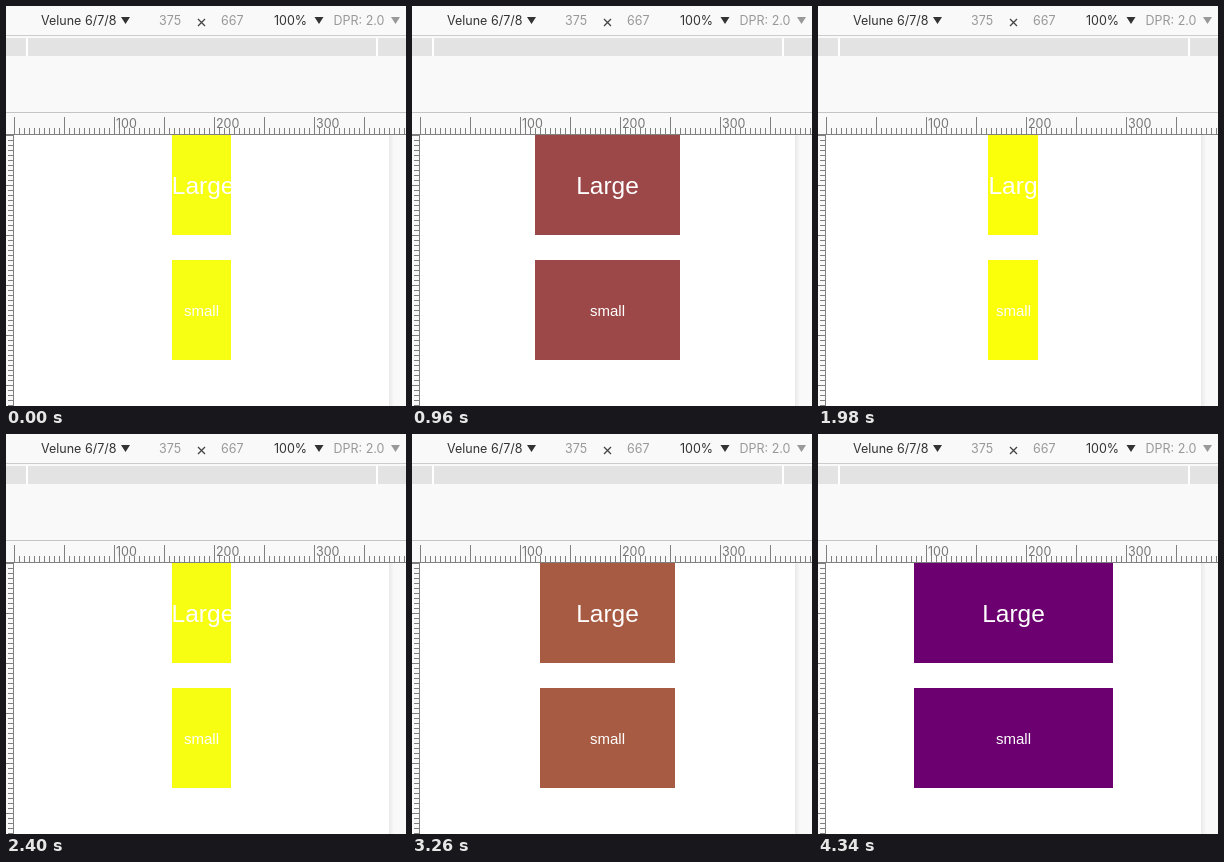
An HTML page for the animation above (4.38 s loop, 400x400 px).

```html
<!DOCTYPE html>
<html lang="en">
<head>
<meta charset="utf-8">
<title>Width and colour</title>
<style>
html, body { margin: 0; width: 100%; height: 100%; overflow: hidden; background: #f9f9f9; }
svg { position: absolute; left: 0; top: 0; font: 12.5px Inter, "Liberation Sans", sans-serif; }
.box {
  position: absolute; height: 100px; color: #fff; text-align: center; white-space: nowrap;
  font: 24.5px/102px "Liberation Sans", Arial, sans-serif;
}
#large { top: 129px; }
#small { top: 254px; font-size: 15px; }
</style>
</head>
<body>
<svg width="400" height="400">
  <defs>
    <linearGradient id="shade">
      <stop offset="0" stop-color="#e9e9e9"/>
      <stop offset="1" stop-color="#f9f9f9"/>
    </linearGradient>
  </defs>
  <path fill="#ccc" d="M0 29h400v1H0z"/>
  <path fill="#e3e3e3" d="M0 32h400v18H0z"/>
  <path fill="#fff" d="M20 32h2v18h-2zM370 32h2v18h-2z"/>
  <path fill="#c4c4c4" d="M0 106h400v1H0z"/>
  <path fill="#fff" d="M8 129h375v271H8z"/>
  <path fill="url(#shade)" d="M383 129h5v271h-5z"/>
  <path id="ticks" stroke="#808080" fill="none" shape-rendering="crispEdges"/>
  <g fill="#333">
    <text x="35" y="19">Velune 6/7/8</text>
    <text x="268" y="19">100%</text>
    <path d="M115 11h9l-4.5 7zM308.500 11h9l-4.500 7z"/>
  </g>
  <g fill="#999">
    <text x="153" y="19">375</text>
    <text x="215" y="19">667</text>
    <text x="327.500" y="19">DPR: 2.0</text>
    <path d="M385 11h9l-4.500 7z"/>
  </g>
  <path stroke="#444" stroke-width="1.3" d="M192 13l7 7m0-7l-7 7"/>
  <g fill="#777">
    <text x="110" y="122">100</text>
    <text x="210" y="122">200</text>
    <text x="310" y="122">300</text>
  </g>
</svg>
<div class="box" id="large">Large</div>
<div class="box" id="small">small</div>
<script>
const LOOP = 4380, CYCLE = 2394, PHASE = 0.1767, CENTER = 195.5;

// progress, red, green, blue
const stops = [
  [0, 252, 255, 10], [0.063, 247, 255, 18], [0.233, 219, 196, 31],
  [0.567, 168, 91, 67], [0.633, 156, 72, 73], [0.913, 120, 0, 104], [1, 108, 0, 112]
];

let d = "M0 128.500H400M7.500 128V400";
for (let n = 0; n < 400; n += 5) {
  const major = n % 50 === 0;
  d += `M${n + 8.5} 128v${major ? -17 : -6}M8 ${n + 129.5}h${major ? -8 : -6}`;
}
document.getElementById("ticks").setAttribute("d", d);

// cubic-bezier(.42, 0, .58, 1)
function easeInOut(x) {
  let lo = 0, hi = 1, s;
  for (let i = 0; i < 24; i++) {
    s = (lo + hi) / 2;
    const at = 1.26 * s * (1 - s) ** 2 + 1.74 * s * s * (1 - s) + s ** 3;
    if (at < x) lo = s; else hi = s;
  }
  return s * s * (3 - 2 * s);
}

function colorAt(p) {
  const i = Math.max(1, stops.findIndex(s => s[0] >= p));
  const a = stops[i - 1], b = stops[i], k = (p - a[0]) / (b[0] - a[0]);
  return `rgb(${[1, 2, 3].map(c => Math.round(a[c] + (b[c] - a[c]) * k))})`;
}

const boxes = document.querySelectorAll(".box");
const start = performance.now();

function draw(now) {
  const t = Math.floor(Math.max(0, now - start) % LOOP / 20) * 20;
  const p = easeInOut((PHASE + t / CYCLE) % 1);
  const w = 50 + 150 * p;
  for (const { style } of boxes) {
    style.left = CENTER - w / 2 + "px";
    style.width = w + "px";
    style.background = colorAt(p);
  }
  requestAnimationFrame(draw);
}
draw(start);
</script>
</body>
</html>
```
